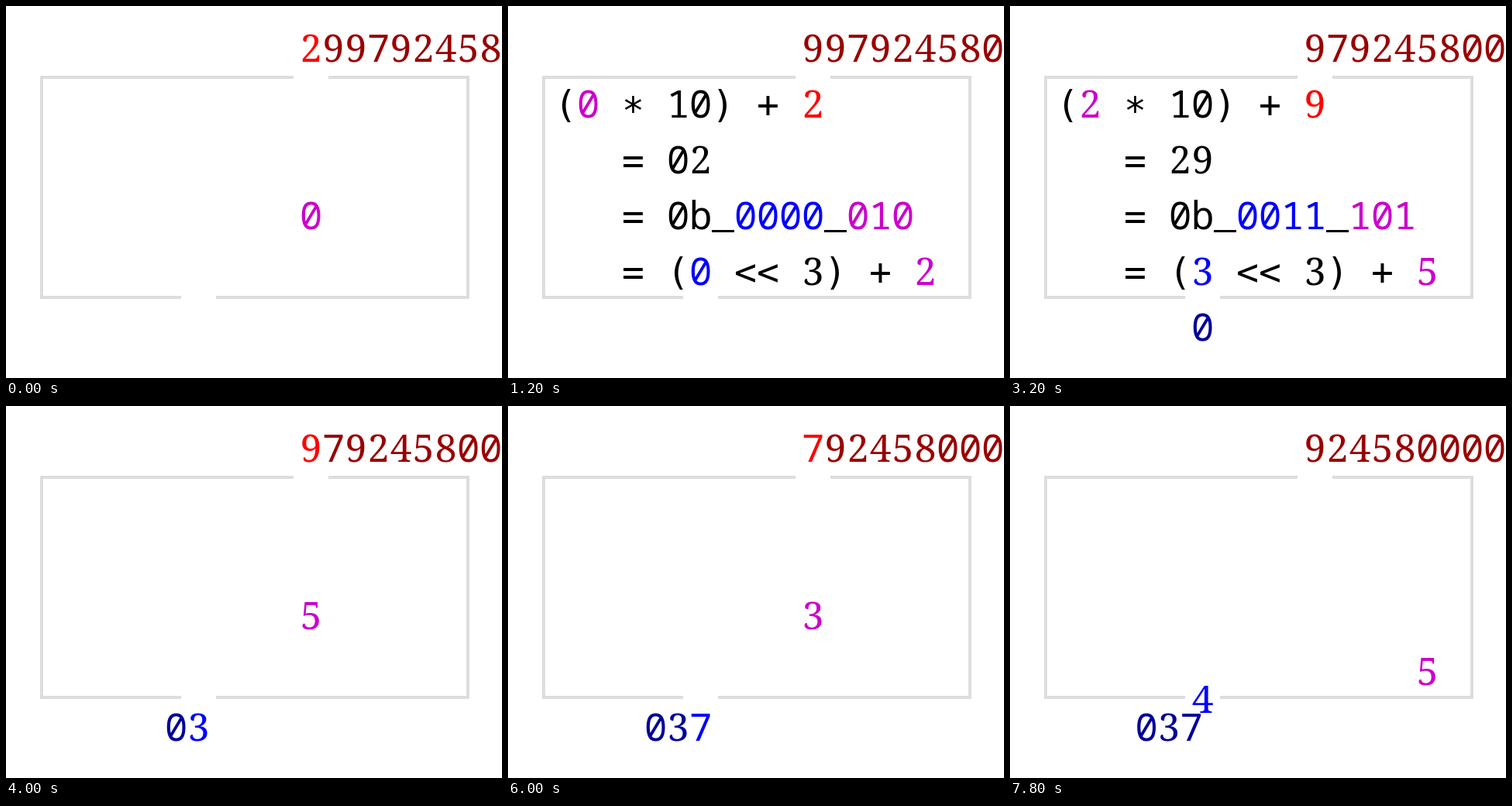
These frames come from a looping animation (640x480 px, 8000 ms). An HTML page with a canvas:

```html
<!DOCTYPE html>
<html lang="en">
<head>
<meta charset="utf-8">
<title>Base conversion</title>
<style>
  html, body { margin: 0; width: 100%; height: 100%; overflow: hidden; background: #fff; }
  canvas { display: block; }
</style>
</head>
<body>
<canvas id="stage" width="640" height="480"></canvas>
<script>
const ctx = document.getElementById('stage').getContext('2d');

const LOOP = 8000, CYCLE = 2000, STEP = 200;
const PITCH = 29, ROW = 72;
const DIGITS = '299792458';
const RED = '#f00', MAROON = '#900', BLUE = '#00f', NAVY = '#009',
      MAGENTA = '#c0c', BLACK = '#000', GREY = '#ddd';

const SERIF = '49.5px "Noto Serif", serif';
const MONO = '49.5px "Noto Sans Mono", monospace';
const SIGN = '48px "DejaVu Sans Mono", monospace';

const colX = col => 321 + (col - 8.5) * PITCH;
const rowY = row => ROW * (row + 1);

function fontFor(ch) {
  if ('234589'.includes(ch)) return SERIF;
  return '017b'.includes(ch) ? MONO : SIGN;
}

// Each character is centred in its own cell of the grid.
function put(text, col, row, color) {
  ctx.fillStyle = color;
  [...text].forEach((ch, i) => {
    if (ch === ' ') return;
    const x = colX(col + i), y = rowY(row);
    if (ch === '_') {
      ctx.fillRect(x - PITCH / 2, y + 1, PITCH, 3);
      return;
    }
    ctx.font = fontFor(ch);
    ctx.fillText(ch, x, y + (ch === '*' ? 8 : 0));
  });
}

function drawBox() {
  ctx.strokeStyle = GREY;
  ctx.lineWidth = 4;
  ctx.beginPath();
  ctx.moveTo(371, 92);
  ctx.lineTo(46, 92);
  ctx.lineTo(46, 376);
  ctx.lineTo(226, 376);
  ctx.moveTo(416, 92);
  ctx.lineTo(596, 92);
  ctx.lineTo(596, 376);
  ctx.lineTo(271, 376);
  ctx.stroke();
}

// Long division by eight: every cycle takes in one digit and gives out one.
function makeCycles(count) {
  let rest = 0, out = '';
  return Array.from({ length: count }, (_, i) => {
    const digit = +DIGITS[i], value = rest * 10 + digit;
    const cycle = { rest, digit, value, high: value >> 3, low: value & 7, out };
    out += cycle.high;
    rest = cycle.low;
    return cycle;
  });
}
const cycles = makeCycles(LOOP / CYCLE);

function drawInput(index, step) {
  const queue = DIGITS + '0'.repeat(9);
  const shift = Math.min(step / 2, 1);
  if (step < 8) put(queue[index], 11, shift, RED);
  put(queue.slice(index + 1, index + 11), 12 - shift, 0, MAROON);
}

function drawOutput(out, step) {
  if (step === 0) {
    put(out.slice(0, -1), 7 - out.length, 4, NAVY);
    put(out.slice(-1), 6, 4, BLUE);
  } else {
    const shift = step > 8 ? 0.5 : 0;
    put(out, 7 - out.length - shift, 4, NAVY);
  }
}

function drawSums(c, step) {
  if (step >= 3) {
    put('(  * 10) +', 0, 0 + 1 - 0, BLACK);
  }
  if (step >= 4) {
    put('= ' + String(c.value).padStart(2, '0'), 3, 2, BLACK);
  }
  if (step >= 5) {
    put('= 0b_', 3, 3, BLACK);
    put(c.high.toString(2).padStart(4, '0'), 8, 3, BLUE);
    put('_', 12, 3, BLACK);
    put(c.low.toString(2).padStart(3, '0'), 13, 3, MAGENTA);
  }
  if (step >= 6) put('= (  << 3) +', 3, 4, BLACK);
}

function draw(time) {
  const tick = Math.floor((time % LOOP) / STEP);
  const perCycle = CYCLE / STEP;
  const index = Math.floor(tick / perCycle), step = tick % perCycle;
  const c = cycles[index];

  ctx.fillStyle = '#fff';
  ctx.fillRect(0, 0, 640, 480);
  ctx.textAlign = 'center';
  drawBox();
  drawInput(index, step);

  // The output line sits one row below the box.
  ctx.save();
  ctx.translate(0, ROW);
  drawOutput(c.out, step);
  ctx.restore();

  if (step < 8) {
    const move = Math.min(step, 2) * 5;
    put(String(c.rest), 11 - move, 3 - Math.min(step, 2), MAGENTA);
    drawSums(c, step);
  }
  if (step >= 6) {
    put(String(c.high), 6, step > 8 ? 4.5 : 4, BLUE);
    put(String(c.low), 16, 4, MAGENTA);
  }
}

function frame() {
  draw(performance.now());
  requestAnimationFrame(frame);
}
draw(0);
requestAnimationFrame(frame);
</script>
</body>
</html>
```
